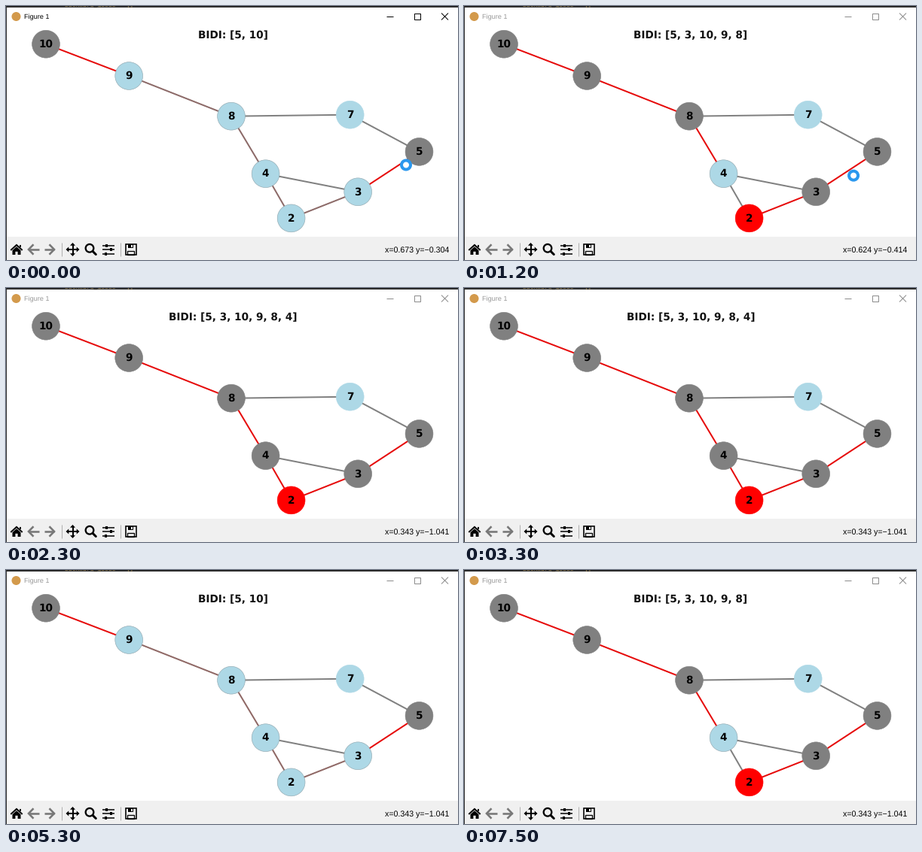
These frames come from a looping animation (600 px wide and 338 px high, 8 s). A matplotlib script:

```python
import matplotlib.pyplot as plt
from matplotlib.animation import FuncAnimation
from matplotlib.patches import Circle, Polygon, Rectangle

W, H, DPI = 600, 338, 100
STEP, LOOP = 100, 8000
PT = 72 / DPI  # points per pixel
GRAY, BLUE, DARK = "#808080", "lightblue", "#2b2b2b"

POS = {10: (53, 50.7), 9: (163.2, 93), 8: (299, 146.7), 7: (456.7, 144.7),
       5: (548.5, 193.9), 4: (344.6, 223.2), 3: (467.2, 247.3), 2: (378.6, 282.4)}
PATH = [(10, 9), (9, 8), (8, 4), (4, 2), (2, 3), (3, 5)]
EDGES = PATH + [(8, 7), (4, 3), (7, 5)]

# start time, nodes seen from 5, nodes seen from 10, tint of stale path edges
SCHEDULE = [
    (0, [5], [10], "#8c6a68"),
    (100, [5, 3], [10, 9], "#84706f"),
    (1100, [5, 3], [10, 9, 8], GRAY),
    (2300, [5, 3], [10, 9, 8, 4], GRAY),
    (4200, [], [], "#9a5650"),
    (5200, [5], [10], "#8f6865"),
    (6300, [5, 3], [10, 9], "#84706f"),
    (7400, [5, 3], [10, 9, 8], GRAY),
]

plt.rcParams["text.hinting"] = "none"
fig = plt.figure(figsize=(W / DPI, H / DPI), dpi=DPI, facecolor="white")
ax = fig.add_axes([0, 0, 1, 1])
ax.set_xlim(0, W)
ax.set_ylim(H, 0)
ax.axis("off")


def line(xs, ys, color="black", width=1.0, z=3, cap="butt"):
    return ax.plot(xs, ys, color=color, lw=width * PT, zorder=z,
                   solid_capstyle=cap, solid_joinstyle="miter")[0]


def rect(x, y, w, h, color, z=2):
    return ax.add_patch(Rectangle((x, y), w, h, fc=color, ec="none", zorder=z))


def outline(x, y, w, h, color="black", width=1.0):
    return ax.add_patch(Rectangle((x, y), w, h, fc="none", ec=color,
                                  lw=width * PT, zorder=3))


def shape(points, color="black", z=3):
    return ax.add_patch(Polygon(points, closed=True, fc=color, ec="none", zorder=z))


def disc(x, y, r, fill, edge="none", width=0.0, z=3):
    return ax.add_patch(Circle((x, y), r, fc=fill, ec=edge, lw=width * PT, zorder=z))


def text(x, y, s, size, font="DejaVu Sans", **kw):
    return ax.text(x, y, s, fontsize=size * PT, family=font, zorder=6, **kw)


def draw_window():
    rect(0, 307, W, H - 307, "#f0f0f0")
    rect(0, 0, W, 2, DARK, 4)
    rect(0, 0, 1, H, DARK, 4)
    text(78, 0, "backward_queue = {}", 8, "DejaVu Sans Mono",
         color="#a08a5c", va="baseline")
    disc(13.5, 14, 6, "#d39a4c")
    caption = text(24, 17.4, "Figure 1", 9.1, "Liberation Sans")
    minimise = line([505, 514], [14, 14])
    maximise = outline(541.5, 9.5, 8, 8)
    close = [line([578, 587], [9.5, 18.5]), line([578, 587], [18.5, 9.5])]
    return caption, [minimise, *close], maximise


def draw_toolbar():
    # home
    line([6.3, 14, 21.7], [325, 318, 325], width=2)
    line([18.6, 18.6], [318, 321], width=1.8)
    shape([(8.5, 325.3), (14, 320.3), (19.5, 325.3), (19.5, 331), (15.6, 331),
           (15.6, 326.8), (12.4, 326.8), (12.4, 331), (8.5, 331)])
    # back and forward
    for x, d in ((36, 1), (58, -1)):
        line([x - 6 * d, x + 7.5 * d], [324, 324], "#787878", 2.6)
        line([x + 0.5 * d, x - 6 * d, x + 0.5 * d], [317.3, 324, 330.7], "#787878", 2.6)
    for x in (73.5, 151.5):
        line([x, x], [315, 333], "#b0b0b0")
    # pan
    cx, cy = 88.5, 324
    line([cx - 7, cx + 7], [cy, cy], width=2)
    line([cx, cx], [cy - 7, cy + 7], width=2)
    for dx, dy in ((1, 0), (-1, 0), (0, 1), (0, -1)):
        bx, by = cx + 5.2 * dx, cy + 5.2 * dy
        shape([(cx + 9 * dx, cy + 9 * dy), (bx - 3.5 * dy, by + 3.5 * dx),
               (bx + 3.5 * dy, by - 3.5 * dx)])
    # zoom
    disc(111, 322.3, 5.3, "none", "black", 2.3)
    line([115, 119.3], [326.3, 330.6], width=3, cap="round")
    # sliders
    for y, knob in ((318.7, 133), (324.2, 139.5), (329.7, 132)):
        line([128, 144], [y, y], width=1.5)
        rect(knob - 1.5, y - 2.1, 3, 4.2, "black", 4)
    # save
    outline(158.5, 317.2, 14, 14, width=1.6)
    rect(161.5, 317.2, 7.5, 5, "black")
    rect(165.8, 318.2, 1.8, 3, "#f0f0f0", 4)
    outline(161.3, 325.6, 8.4, 5.6, width=1.3)


caption, buttons, maximise = draw_window()
draw_toolbar()
title = text(301, 43.2, "", 13.6, weight="bold", color="#111111",
             ha="center", va="baseline")
status = text(588.5, 327.8, "", 10.6, "Liberation Sans", ha="right")
edges = {(a, b): line(*zip(POS[a], POS[b]), GRAY, 2) for a, b in EDGES}
nodes = {n: disc(*p, 18.4, BLUE, "none", 0.6, 4) for n, p in POS.items()}
for n, (x, y) in POS.items():
    text(x, y + 4.2, str(n), 13.6, weight="bold", ha="center", va="baseline")
ring = disc(531, 211.5, 6, "white", "#2b98ee", 4, 7)


def current_state(t):
    return [s for s in SCHEDULE if s[0] <= t][-1][1:]


def draw_graph(t):
    front, back, stale = current_state(t)
    seen = set(front + back)
    joined = [", ".join(map(str, part)) for part in (front, back)]
    title.set_text(f"BIDI: [{joined[0]}, {joined[1]}]")
    for (a, b), artist in edges.items():
        on_path = (a, b) in PATH
        active = on_path and (a in seen or b in seen)
        artist.set_color("#e60a0a" if active else stale if on_path else GRAY)
    for n, artist in nodes.items():
        if n == 2 and 3 in seen:
            fill = rim = "red"
        elif n in seen:
            fill = rim = GRAY
        else:
            fill, rim = BLUE, BLUE if n == 7 else "#90a6ae"
        artist.set_facecolor(fill)
        artist.set_edgecolor(rim)


def draw_pointer(t):
    u = min(max((t - 1100) / 500, 0), 1)
    u = u * u * (3 - 2 * u)
    x, y = 531 - 134 * u, 211.5 + 136 * u
    ring.center = x, y
    ring.set_visible(t < 1600)
    v = min((y - 211.5) / 95, 1)  # coordinates freeze at the lower edge
    label = f"x={0.673 - 0.33 * v:.3f} y={-0.304 - 0.737 * v:.3f}"
    status.set_text(label.replace("-", "\u2212"))


def update(frame):
    t = frame * STEP
    focused = t < 100
    caption.set_color("black" if focused else "#999999")
    for b in buttons:
        b.set_color("black" if focused else "#8c8c8c")
    maximise.set_edgecolor("black" if focused else "#8c8c8c")
    draw_graph(t)
    draw_pointer(t)
    return []


anim = FuncAnimation(fig, update, frames=LOOP // STEP, interval=STEP,
                     init_func=lambda: update(0), repeat=True, repeat_delay=0,
                     blit=False)
plt.show()
```
